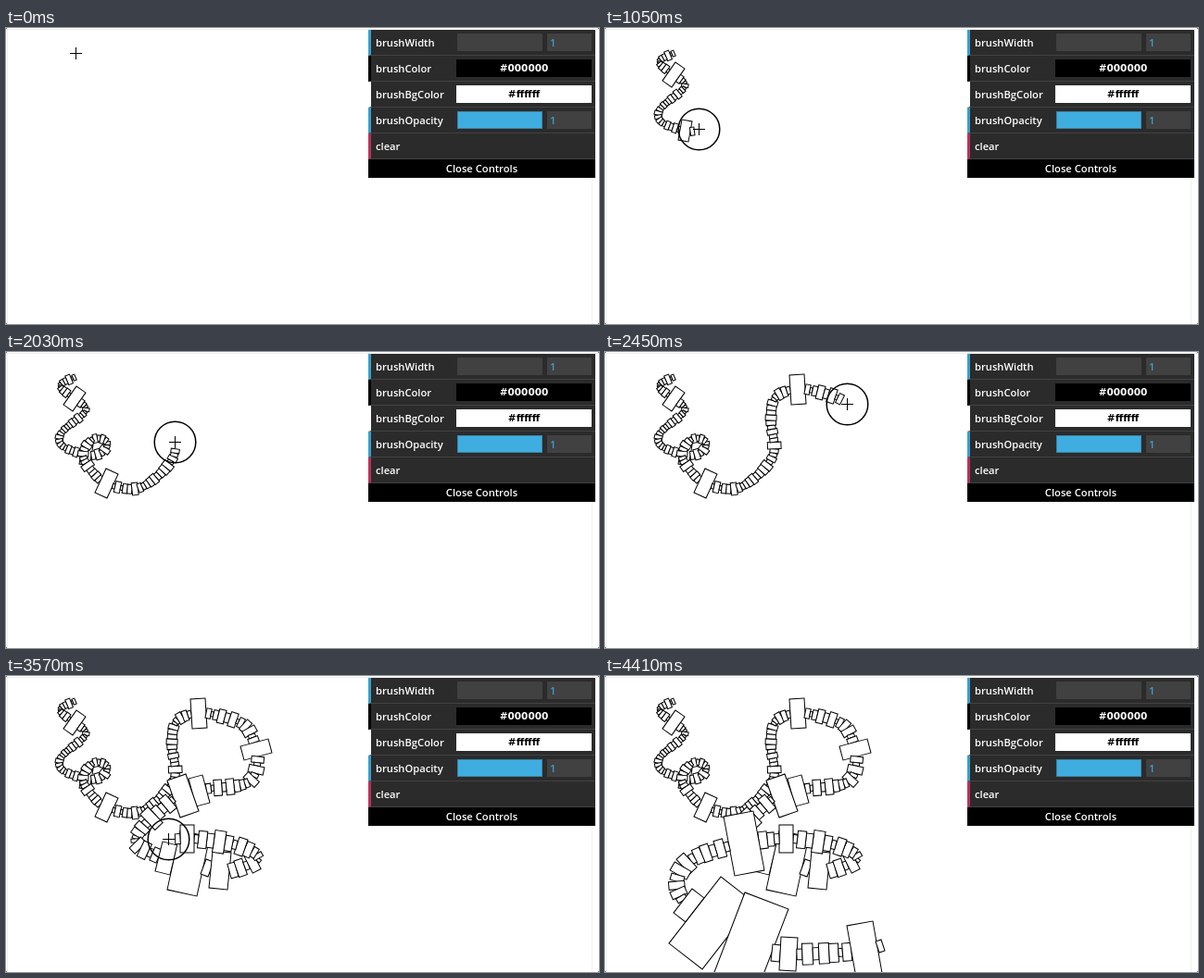
Animation of 640 by 320 pixels, one loop 4480 ms. Source, as an HTML page with a canvas:

```html
<!DOCTYPE html>
<html>
<head>
<meta charset="utf-8">
<style>
html, body { margin: 0; width: 640px; height: 320px; overflow: hidden; background: #fff; }
canvas { position: absolute; left: 0; top: 0; }
#gui {
  position: absolute; left: 391px; top: 2px; width: 245px; height: 160px;
  background: #000; color: #fff; font: 600 11.2px/27px "Open Sans", sans-serif;
}
.row {
  position: relative; height: 27px; padding-left: 5px; background: #2b2b2b;
  border-left: 3px solid var(--edge); border-bottom: 1px solid #424242;
}
.row * { position: absolute; top: 4px; height: 19px; line-height: 19px; }
.track { left: 93px; width: 92px; background: #414141; }
.full { background: #40ade0; box-shadow: inset 0 0 0 1px #3a86aa; }
.num { left: 190px; width: 45px; padding-left: 3px; background: #414141; color: #3a9fd2; }
.swatch {
  left: 92px; width: 146px; text-align: center;
  font: bold 10.5px/19px "DejaVu Sans", sans-serif;
}
.close { text-align: center; line-height: 20px; }
</style>
</head>
<body>
<canvas id="stage" width="640" height="320"></canvas>
<div id="gui">
  <div class="row" style="--edge:#389fca">brushWidth<i class="track"></i><span class="num">1</span></div>
  <div class="row" style="--edge:#000">brushColor<b class="swatch" style="background:#000;color:#fff">#000000</b></div>
  <div class="row" style="--edge:#fff">brushBgColor<b class="swatch" style="background:#fff;color:#000">#ffffff</b></div>
  <div class="row" style="--edge:#389fca">brushOpacity<i class="track full"></i><span class="num">1</span></div>
  <div class="row" style="--edge:#b8325c">clear</div>
  <div class="close">Close Controls</div>
</div>
<script>
const LOOP = 4480, TICK = 70, LEAP = 1;
const g = document.getElementById('stage').getContext('2d');

// Key points of the hand's path; a LEAP is reached in one fast step
const way = [
  [75,27], [58,36], [69,47], [79,54,LEAP], [86,64], [60,87], [60,101], [81,110], [92,112,LEAP],
  [105,108], [109,97], [94,94], [83,113], [102,139], [115,145,LEAP],
  [147,146], [181,113], [179,74], [183,50], [200,41], [216,40,LEAP],
  [256,52], [268,72], [272,87,LEAP], [262,115], [216,122], [201,126,LEAP], [181,133,LEAP],
  [139,176], [165,195], [181,199,LEAP], [213,206,LEAP], [221,209], [241,211,LEAP],
  [273,197], [249,183], [203,176], [188,176,LEAP], [166,178], [134,184,LEAP],
  [92,199], [77,222], [84,243], [97,253,LEAP], [133,281,LEAP], [180,299,LEAP],
  [189,300], [207,301,LEAP], [266,298], [294,293,LEAP], [300,291]
];

function spline(a, b, c, d, u) {
  return b + u / 2 * (c - a + u * (2 * a - 5 * b + 4 * c - d + u * (3 * (b - c) + d - a)));
}

function noise(n) {
  const v = Math.sin(n * 12.9898) * 43758.5453;
  return v - Math.floor(v) - .5;
}

// Ordinary steps lengthen along the way and are a little uneven
function buildTrail() {
  const trail = [{ x: way[0][0], y: way[0][1], at: 0 }];
  for (let i = 1; i < way.length; i++) {
    const b = way[i - 1], c = way[i], a = way[i - 2] || b, d = way[i + 1] || c;
    const length = Math.hypot(c[0] - b[0], c[1] - b[1]);
    const n = c[2] === LEAP ? 1 : Math.max(1, Math.round(length / (3 + .12 * i)));
    for (let k = 1; k <= n; k++) {
      const u = k < n ? (k + .6 * noise(trail.length)) / n : 1;
      const [x, y] = [0, 1].map(j => spline(a[j], b[j], c[j], d[j], u));
      trail.push({ x, y, at: i - 1 + k / n });
    }
  }
  return trail;
}
const trail = buildTrail();

// Time in ms and position along the key points, turned into trail steps
const pace = [[0, 0], [1050, 8.6], [1610, 12.5], [2450, 21.2], [3080, 28.5], [3990, 47.1], [4340, 50]]
  .map(([t, at]) => [t, trail.findIndex(p => p.at >= at)]);

function progress(t) {
  const i = pace.findIndex(p => p[0] > t);
  if (i < 0) return trail.length - 1;
  const [t0, s0] = pace[i - 1], [t1, s1] = pace[i];
  return Math.round(s0 + (s1 - s0) * (t - t0) / (t1 - t0));
}

// Each block is as long as its step and twice as wide
function drawBlock(p, q) {
  const dx = q.x - p.x, dy = q.y - p.y, d = Math.hypot(dx, dy);
  g.save();
  g.translate(p.x, p.y);
  g.rotate(Math.atan2(dy, dx));
  g.fillRect(0, -d, d, 2 * d);
  g.strokeRect(0, -d, d, 2 * d);
  g.restore();
}

function drawPointer(p, pressed) {
  const x = Math.floor(p.x) + .5, y = Math.floor(p.y) + .5;
  g.beginPath();
  g.moveTo(x - 6.5, y); g.lineTo(x + 6.5, y);
  g.moveTo(x, y - 6.5); g.lineTo(x, y + 6.5);
  g.stroke();
  if (!pressed) return;
  g.lineWidth = 1.5;
  g.beginPath();
  g.arc(x, y, 22.3, 0, 7);
  g.stroke();
}

function drawPage() {
  g.fillStyle = '#fff';
  g.fillRect(0, 0, 640, 320);
  g.fillStyle = '#f0f0f0';
  g.fillRect(0, 1, 640, 1);
  g.fillRect(1, 0, 1, 320);
  g.fillRect(632, 0, 1, 320);
  g.fillStyle = '#777';
  for (const x of [0, 639]) for (const y of [0, 319]) g.fillRect(x, y, 1, 1);
}

function draw(now) {
  const t = Math.floor(now % LOOP / TICK) * TICK;
  const at = progress(t), ended = t >= LOOP - TICK;
  drawPage();
  g.fillStyle = '#fff';
  g.strokeStyle = '#000';
  g.lineWidth = 1;
  // The brush trails one step behind the pointer
  const last = ended ? at : at - 1;
  for (let i = 1; i <= last; i++) drawBlock(trail[i - 1], trail[i]);
  if (!ended) drawPointer(trail[at], t > 0);
  requestAnimationFrame(draw);
}
requestAnimationFrame(draw);
</script>
</body>
</html>
```
